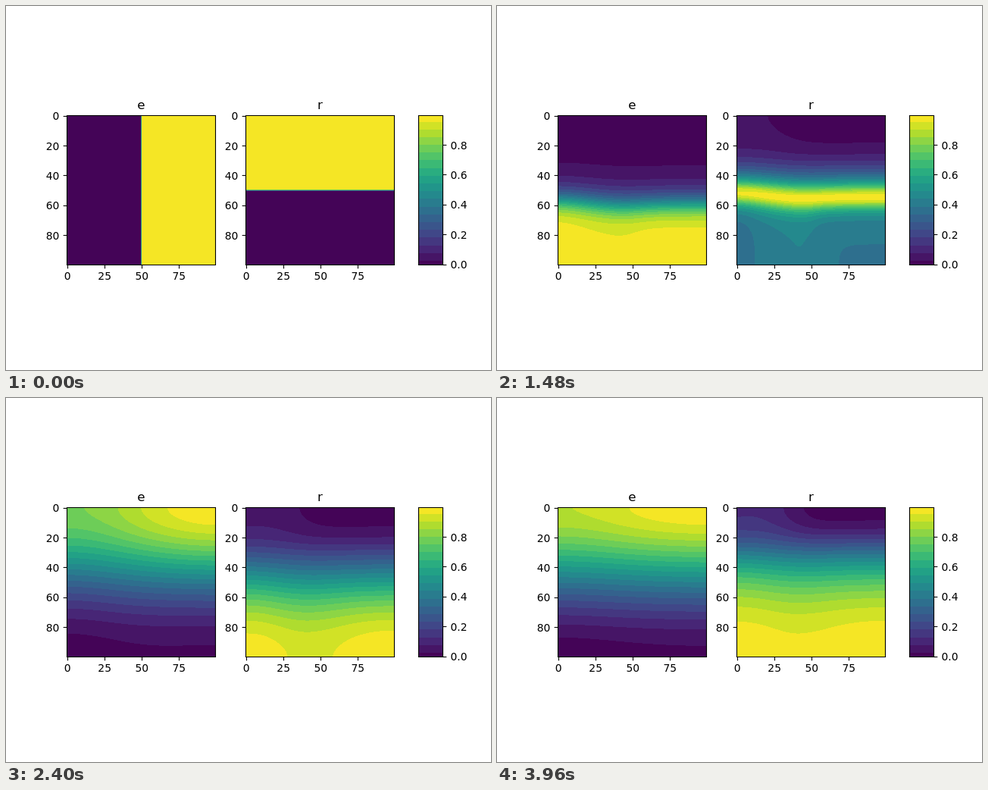
Recreate the animation shown at these times as an HTML page with a canvas. Size 640 by 480 pixels, loop 4 s.

```html
<!DOCTYPE html>
<html lang="en">
<head>
<meta charset="utf-8">
<title>Excitation and recovery</title>
<style>
  html, body { margin: 0; width: 100%; height: 100%; overflow: hidden; background: #fff; }
  #stage { position: relative; width: 640px; height: 480px; }
  canvas, svg { position: absolute; }
  canvas { top: 144px; }
  #e { left: 80px; }
  #r { left: 316px; }
  #bar { left: 544px; }
  svg { left: 0; top: 0; }
  text { font: 13.89px "DejaVu Sans", sans-serif; }
  .title { font-size: 16.67px; }
  .line { fill: none; stroke: #000; stroke-width: 1.11; }
</style>
</head>
<body>
<div id="stage">
  <canvas id="e" width="197" height="198"></canvas>
  <canvas id="r" width="197" height="198"></canvas>
  <canvas id="bar" width="33" height="198"></canvas>
  <svg id="axes" width="640" height="480"></svg>
</div>
<script>
const N = 100, FRAMES = 100, FRAME_MS = 40;
const DT = 0.04, DIFFUSION = 80;
const A = 0.1, B = 0.1, K = 8, EPS = 0.01, MU1 = 0.07, MU2 = 0.3;

// Colour scale: viridis cut into 20 flat bands
const STOPS = ['440154', '482475', '414487', '355f8d', '2a788e', '21918c',
  '22a884', '44bf70', '7ad151', 'bddf26', 'fde725']
  .map(hex => [0, 2, 4].map(i => parseInt(hex.slice(i, i + 2), 16)));
const BANDS = 20, FIRST = 0.03, BAND = 0.0515;

function viridis(v) {
  const p = Math.min(v, 0.9999) * 10, i = Math.floor(p);
  return STOPS[i].map((c, j) => Math.round(c + (STOPS[i + 1][j] - c) * (p - i)));
}
const palette = Array.from({ length: BANDS }, (_, k) =>
  viridis(k === 0 ? 0.008 : k === BANDS - 1 ? 0.987 : FIRST + (k - 0.5) * BAND));
const bandOf = v => v < FIRST ? 0 : Math.min(BANDS - 1, 1 + Math.floor((v - FIRST) / BAND));

// Implicit diffusion along one line with closed ends
const lam = DIFFUSION * DT;
const upper = new Float64Array(N), inv = new Float64Array(N);
for (let i = 0; i < N; i++) {
  const diag = 1 + lam * (i === 0 || i === N - 1 ? 1 : 2);
  inv[i] = 1 / (diag - (i ? lam * upper[i - 1] : 0));
  upper[i] = lam * inv[i];
}
function diffuseLine(u, start, stride) {
  let p = start;
  u[p] *= inv[0];
  for (let i = 1; i < N; i++) {
    p += stride;
    u[p] = (u[p] + lam * u[p - stride]) * inv[i];
  }
  for (let i = N - 2; i >= 0; i--) {
    p -= stride;
    u[p] += upper[i] * u[p + stride];
  }
}

// Aliev-Panfilov reaction followed by diffusion of e
function step(e, r) {
  for (let p = 0; p < N * N; p++) {
    const u = e[p], w = r[p];
    e[p] = u + DT * u * (K * (u - A) * (1 - u) - w);
    r[p] = w + DT * (EPS + MU1 * w / (MU2 + u)) * (K * u * (1 + B - u) - w);
  }
  for (let i = 0; i < N; i++) diffuseLine(e, i * N, 1);
  for (let i = 0; i < N; i++) diffuseLine(e, i, N);
}

function normalised(field) {
  let lo = Infinity, hi = -Infinity;
  for (const v of field) {
    if (v < lo) lo = v;
    if (v > hi) hi = v;
  }
  return Float32Array.from(field, v => (v - lo) / (hi - lo));
}

const modelTime = frame => frame + 2.4 * (1 - Math.exp(-frame / 2));

function simulate() {
  const e = new Float64Array(N * N), r = new Float64Array(N * N);
  for (let p = 0; p < N * N; p++) {
    e[p] = p % N >= N / 2 ? 1 : 0;
    r[p] = p < N * N / 2 ? 1 : 0;
  }
  const frames = [];
  for (let f = 0, steps = 0; f < FRAMES; f++) {
    for (; steps * DT < modelTime(f) - DT / 2; steps++) step(e, r);
    frames.push({ e: normalised(e), r: normalised(r) });
  }
  return frames;
}

// Bilinear sampling positions for a row or column of pixels
function samples(count) {
  return Array.from({ length: count }, (_, i) => {
    const g = Math.max(0, Math.min(N - 1.001, (i + 0.5) * N / count - 0.5));
    return { i: Math.floor(g), t: g % 1 };
  });
}

function makePanel(id) {
  const canvas = document.getElementById(id), ctx = canvas.getContext('2d');
  const image = ctx.createImageData(canvas.width, canvas.height);
  const cols = samples(canvas.width), rows = samples(canvas.height);
  image.data.fill(255);
  return field => {
    let out = 0;
    for (const y of rows) for (const x of cols) {
      const p = y.i * N + x.i;
      const top = field[p] + (field[p + 1] - field[p]) * x.t;
      const low = field[p + N] + (field[p + N + 1] - field[p + N]) * x.t;
      const c = palette[bandOf(top + (low - top) * y.t)];
      image.data[out] = c[0];
      image.data[out + 1] = c[1];
      image.data[out + 2] = c[2];
      out += 4;
    }
    ctx.putImageData(image, 0, 0);
  };
}

function drawBar() {
  const ctx = document.getElementById('bar').getContext('2d');
  for (let y = 0; y < 198; y++) {
    ctx.fillStyle = `rgb(${palette[bandOf(1 - (y + 0.5) / 198)]})`;
    ctx.fillRect(0, y, 33, 1);
  }
}

function drawAxes() {
  let svg = '';
  const snap = v => Math.floor(v) + 0.5;
  const line = d => { svg += `<path class="line" d="${d}"/>`; };
  const label = (x, y, anchor, text, cls = '') => {
    svg += `<text class="${cls}" x="${x}" y="${y}" text-anchor="${anchor}">${text}</text>`;
  };
  const unit = 1.9636;
  for (const [left, name] of [[80, 'e'], [316, 'r']]) {
    for (const v of [0, 25, 50, 75]) {
      const x = left + 0.1 + (v + 0.5) * unit;
      line(`M${snap(x)} 341.5v4.86`);
      label(x, 361, 'middle', v);
    }
    for (const v of [0, 20, 40, 60, 80]) {
      const y = 144.4 + (v + 0.5) * unit;
      line(`M${left + 0.5} ${snap(y)}h-4.86`);
      label(left - 9.7, y + 5.1, 'end', v);
    }
    line(`M${left + 0.5} 144.5h196v197h-196z`);
    label(left + 98.4, 136, 'middle', name, 'title');
  }
  for (let k = 0; k < 5; k++) {
    const y = 341 - k * 39.4;
    line(`M576.5 ${snap(y)}h4.86`);
    label(586.5, y + 5.1, 'start', (k / 5).toFixed(1));
  }
  line('M544.5 144.5h32v197h-32z');
  document.getElementById('axes').innerHTML = svg;
}

drawBar();
drawAxes();
const frames = simulate();
const panels = { e: makePanel('e'), r: makePanel('r') };
const start = performance.now();
let shown = -1;

function play() {
  const elapsed = Math.max(0, performance.now() - start);
  const index = Math.floor(elapsed / FRAME_MS) % FRAMES;
  if (index !== shown) {
    shown = index;
    panels.e(frames[index].e);
    panels.r(frames[index].r);
  }
  requestAnimationFrame(play);
}
play();
</script>
</body>
</html>
```
